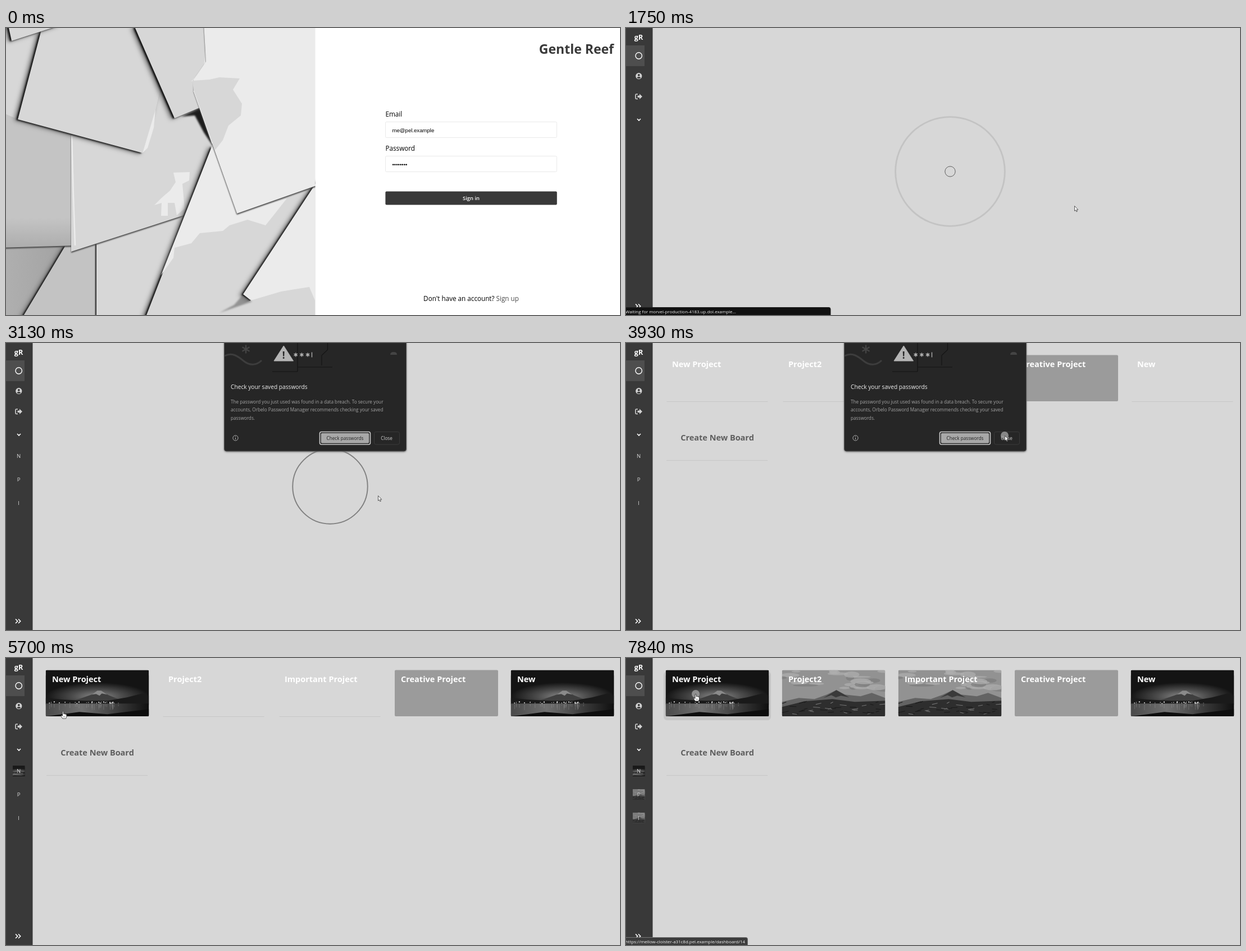
An HTML page for the animation above (7.99 s loop, 1093 by 512 pixels).

```html
<!DOCTYPE html>
<html lang="en">
<head>
<meta charset="utf-8">
<title>Board app demo</title>
<style>
html, body { margin: 0; width: 100%; height: 100%; overflow: hidden; background: #fff; }
svg { display: block; width: 100%; height: 100%; }
text { font-family: "Open Sans", "Noto Sans", sans-serif; white-space: pre; }
.b { font-weight: 700; }
.mid { text-anchor: middle; }
.lab { font-size: 11.7px; }
.ui { font-size: 8.2px; }
.arial { font-family: "Liberation Sans", Arial, sans-serif; font-size: 9.6px; }
.sheet { filter: drop-shadow(-3px 1px 1.5px #111) drop-shadow(-4px 1px 3.5px #777); }
.thin { filter: drop-shadow(-1.5px 1px 1px #1c1c1c); }
.under { filter: drop-shadow(0 2px 1px #444); }
.haze { filter: blur(1.5px); }
</style>
</head>
<body>
<svg id="stage" viewBox="0 0 1093 512" preserveAspectRatio="none"></svg>
<script>
const LOOP = 7990;
const stage = document.getElementById('stage');

let seed = 7;
const rnd = () => (seed = (seed * 16807) % 2147483647) / 2147483647;
const many = (n, f) => Array.from({ length: n }, (_, i) => f(i)).join('');
const rect = (x, y, w, h, fill, more = '') =>
  `<rect x="${x}" y="${y}" width="${w}" height="${h}" fill="${fill}" ${more}/>`;
const path = (d, fill, more = '') => `<path d="${d}" fill="${fill}" ${more}/>`;
const line = (d, color, w = 1, more = '') => path(d, 'none', `stroke="${color}" stroke-width="${w}" ${more}`);
const text = (x, y, s, fill, cls = '', size = '') =>
  `<text x="${x}" y="${y}" fill="${fill}" class="${cls}"${size && ` font-size="${size}"`}>${s}</text>`;
const group = (id, body, more = '') => `<g id="${id}" ${more}>${body}</g>`;

// Overlapping paper sheets, lowest first
const sheet = (d, fill, cls = 'sheet') => path(d + 'Z', fill, `class="${cls}"`);
const paper = `<g clip-path="url(#half)">
  ${rect(0, 0, 550, 512, '#d7d7d7')}
  ${sheet('M-9 388L110 386L31 520H-9', 'url(#shade)', 'thin')}
  ${sheet('M107 386L165 380V520H27', '#c3c3c3')}
  ${sheet('M161 384L330 326V520H161', '#d7d7d7', 'thin')}
  ${sheet('M-9 150L21 163L120 188L125 388L-9 392', 'url(#wall)', 'under')}
  ${sheet('M116 188L230 80L345 130L369 210L317 334L116 399', '#d7d7d7', 'under')}
  ${path('M298 258L327 257L326 272L314 278L318 322L304 334L300 312L288 312L288 335L276 335L277 312L264 316L277 303L292 290L302 275Z', '#ebebeb')}
  ${line('M117 192L120 300L123 388', '#ececec', 2.5)}
  ${sheet('M367 210L411 325L555 275V520H247', '#d7d7d7')}
  ${path('M367 210L411 331L500 304L478 332L462 352L430 342L398 352L386 362L345 366L330 384L300 392L298 410L276 441Z', '#ebebeb')}
  ${sheet('M556 270L422 475L436 486L480 520H560', '#ebebeb')}
  ${path('M360 512L436 486L490 470L540 462L550 486V512Z', '#d7d7d7')}
  ${path('M438 488L420 478L406 494L380 508Z', '#777', 'class="haze" opacity=".7"')}
  ${sheet('M62 7L21 163L243 223L266 148L275 109L240 -9H62', '#d7d7d7')}
  ${path('M266 146L243 223L252 214L263 178Z', '#ebebeb')}
  ${path('M345 142L369 212L352 186L336 156L312 158Z', '#1c1c1c', 'class="haze"')}
  ${sheet('M229 -2L300 161L345 142L420 -9', '#d7d7d7')}
  ${path('M366 0L356 30L352 70L330 95L380 92L420 0Z', '#ebebeb')}
  ${sheet('M334 112L411 331L556 280V-9H352L356 60L334 92', '#ebebeb', 'under')}
  ${path('M334 112L332 94L362 92L380 88L416 90L404 110L420 135L418 156L396 174L386 200L372 218Z', '#d7d7d7')}
  ${line('M334 112L367 206', '#f4f4f4')}${line('M367 208L411 331', '#999')}
  ${sheet('M3 -9L10 23L100 -6', '#d7d7d7')}
</g>`;

const field = y => rect(675.5, y, 305, 28, '#fff', 'rx="2" stroke="#e9e9e9"');
const mail = 'me@pel.example', dots = '••••••••';
const login = rect(0, 0, 1093, 512, '#fff') + paper +
  text(1082, 46, 'Gentle Reef', '#393939', 'b', 23).replace('<text', '<text text-anchor="end"') +
  text(675.5, 158, 'Email', '#000', 'lab') + field(167.5) +
  text(675.5, 219, 'Password', '#000', 'lab') + field(228.5) +
  group('autofill', text(687.5, 185.5, mail, '#000', 'arial') + text(687.5, 246.5, dots, '#000', 'arial')) +
  group('filled', text(687.5, 185.5, mail, '#000', 'lab') + text(687.5, 246.5, dots, '#000', 'lab')) +
  rect(675.4, 291.4, 305.4, 24.2, '#393939', 'rx="2" id="submit"') +
  text(828, 307, 'Sign in', '#fff', 'mid', 9.4).replace('<text', '<text font-weight="600"') +
  `<text x="828" y="487" class="lab mid">Don't have an account? <tspan fill="#4a4a4a">Sign up</tspan></text>`;

// Card pictures, 184 x 83
const lake = rect(0, 0, 184, 83, '#141414') +
  rect(0, 10, 184, 50, 'url(#glow)') +
  path('M34 60L62 51L82 44L92 37H99L112 45L134 54L156 60Z', '#3f3f3f') +
  path('M82 44L92 37H99L110 44L100 42L96 46L90 43Z', '#8a8a8a') +
  path('M0 50L30 53L70 55L110 55L145 49L172 42L184 46V62H0Z', '#1a1a1a') +
  rect(0, 60, 184, 23, 'url(#water)') +
  many(34, () => {
    const x = rnd() * 130, h = 2 + rnd() * 9;
    return `<circle cx="${x}" cy="${57 + rnd() * 3}" r="${.4 + rnd() * .8}" fill="#eee"/>` +
      rect(x - .4, 61, .9, h, '#bbb', 'opacity=".3"');
  }) + path('M0 83L60 75L110 79L184 70V83Z', '#0d0d0d');
const peaks = rect(0, 0, 184, 83, '#929292') +
  many(26, () => `<ellipse cx="${rnd() * 184}" cy="${rnd() * 34}" rx="${6 + rnd() * 17}" ry="${1.5 + rnd() * 4}" fill="${rnd() < .6 ? '#b0b0b0' : '#7c7c7c'}" opacity=".7"/>`) +
  path('M0 57L30 50L58 52L80 44L97 36L112 44L140 47L160 41L184 50V83H0Z', '#636363') +
  path('M74 50L97 36L120 49L105 46L96 49L88 45Z', '#3a3a3a') +
  path('M0 66L40 56L90 52L130 57L184 55V83H0Z', '#2e2e2e') +
  many(40, () => {
    const x = rnd() * 175, y = 57 + rnd() * 23;
    return line(`M${x} ${y}l${4 + rnd() * 9} ${rnd() * 5 - 3}`, rnd() < .5 ? '#747474' : '#1a1a1a', 1.1);
  });

const cardX = i => 70.5 + 207 * i;
const names = ['New Project', 'Project2', 'Important Project', 'Creative Project', 'New'];
const pic = (id, x, y, w, h) => `<use href="#${id}" x="${x}" y="${y}" width="${w}" height="${h}"/>`;
const rule = (x, y) => line(`M${x + 2} ${y}h180`, '#c6c6c6');
const card = (id, i) => pic(id, cardX(i), 21.5, 184, 82.5);
const boards = group('rulesA', rule(cardX(0), 104.5) + rule(cardX(4), 104.5)) +
  group('rulesB', rule(cardX(1), 104.5) + rule(cardX(2), 104.5)) + rule(70, 209.5) +
  rect(67, 24, 191, 87, '#c6c6c6', 'rx="6" id="shadow"') +
  group('lakes', card('lake', 0) + card('lake', 4)) +
  group('peaksCards', card('peaks', 1) + card('peaks', 2)) +
  rect(cardX(3) + .5, 21.5, 184, 82.5, '#9b9b9b', 'rx="2"') +
  names.map((s, i) => text(82 + 207 * i, 42.5, s, '#fff', 'b', 14.5)).join('') +
  text(162.5, 174, 'Create New Board', '#5e5e5e', 'b mid', 14.5);

const thumb = (id, y) => pic(id, 12, y, 21.5, 19);
const sidebar = rect(0, 0, 47.5, 512, '#393939') + rect(0, 31, 33, 37, '#4e4e4e') +
  text(22.5, 21, 'gR', '#fff', 'b mid', 12.6) +
  '<circle cx="22.7" cy="49.5" r="5.7" fill="none" stroke="#fff" stroke-width="1.4"/>' +
  '<circle cx="22.8" cy="85.7" r="5.6" fill="#d2d2d2"/><circle cx="22.8" cy="84" r="1.9" fill="#393939"/>' +
  path('M19.3 88.9Q20 87 22.8 87T26.3 88.9Q23 91.4 19.3 88.9Z', '#393939') +
  line('M21 118H18.5Q17 118 17 119.5V125Q17 126.5 18.5 126.5H21', '#d2d2d2', 1.6) +
  path('M20.5 120.6H24V117.6L29 122.3L24 127V124H20.5Z', '#d2d2d2') +
  line('M20 162L23 165L26 162', '#fff', 1.7) +
  line('M17 492.5L20.7 496.3L17 500M22 492.5L25.7 496.3L22 500', '#fff', 1.6) +
  group('thumbA', thumb('lake', 192), 'opacity=".85"') +
  group('thumbB', thumb('peaks', 234) + thumb('peaks', 275.5), 'opacity=".75"') +
  group('letters', ['N', 'P', 'I'].map((c, i) => text(22.7, 205.3 + 41.6 * i, c, '#d6d6d6', 'mid', 9.6)).join(''));

const star = (x, y, r, c, w) => line(many(3, i => {
  const a = Math.PI * (i / 3 + .5), dx = r * Math.cos(a), dy = r * Math.sin(a);
  return `M${x - dx} ${y - dy}L${x + dx} ${y + dy}`;
}), c, w);
const dialog = path('M388.5 -9H712.5V189Q712.5 193 708.5 193H392.5Q388.5 193 388.5 189Z', '#262626',
    'stroke="#555" style="filter:drop-shadow(0 1px 1.5px #777)"') +
  star(427, 11, 7.5, '#444', 2.4) +
  line('M389 23C402 16 412 23 423 32S446 40 455 31', '#3d3d3d', 3) +
  line('M474 51H519M519 43H581M519 0V51M572.5 0V12L562 22V40', '#151515', 1.2) +
  path('M494.3 5L477 32H511.5Z', '#b5b5b5', 'stroke="#b5b5b5" stroke-linejoin="round"') +
  text(494.3, 28, '!', '#262626', 'b mid', 17) +
  many(3, i => star(515.7 + 10.7 * i, 21, 3.6, '#b5b5b5', 1.5)) + line('M544.5 16.5V25.5', '#b5b5b5', 1.3) +
  path('M684 21Q684 16 690 16T696 21Z', '#444') +
  text(400, 82, 'Check your saved passwords', '#f0f0f0', '', 10.2) +
  ['The password you just used was found in a data breach. To secure your',
    'accounts, Orbelo Password Manager recommends checking your saved',
    'passwords.'].map((s, i) => text(400, 107.5 + 14.5 * i, s, '#a3a3a3', 'ui')).join('') +
  '<circle cx="408.5" cy="169.5" r="4.6" fill="none" stroke="#b5b5b5"/>' +
  line('M408.5 169V172M408.5 166.7V167.8', '#b5b5b5') +
  rect(558.5, 158.5, 90, 22.5, '#262626', 'rx="3" stroke="#ccc" stroke-width="1.6"') +
  rect(560.8, 160.8, 85.4, 18, '#a8a8a8', 'rx="2"') +
  text(603.5, 172.7, 'Check passwords', '#222', 'ui mid') +
  rect(655.5, 158.5, 45, 22.5, '#262626', 'rx="3" stroke="#3a3a3a"') +
  text(677.5, 172.7, 'Close', '#d0d0d0', 'ui mid');

const status = (id, w, fill, edge, s) => group(id,
  path(`M-2 498.5H${w - 3}Q${w} 498.5 ${w} 501.5V514H-2Z`, fill, `stroke="${edge}"`) +
  text(-1, 508.7, s, '#f2f2f2', '', 7.9));

stage.innerHTML = `<defs>
  <clipPath id="half"><path d="M0 0H550.5V512H0Z"/></clipPath>
  <clipPath id="round"><rect width="184" height="83" rx="3"/></clipPath>
  <linearGradient id="shade"><stop stop-color="#b0b0b0"/><stop offset="1" stop-color="#a2a2a2"/></linearGradient>
  <linearGradient id="wall" x2="0" y2="1"><stop stop-color="#c4c4c4"/><stop offset=".78" stop-color="#c4c4c4"/><stop offset="1" stop-color="#adadad"/></linearGradient>
  <linearGradient id="water"><stop stop-color="#4a4a4a"/><stop offset=".35" stop-color="#707070"/><stop offset="1" stop-color="#0f0f0f"/></linearGradient>
  <radialGradient id="glow" cy=".75"><stop stop-color="#8a8a8a"/><stop offset=".5" stop-color="#4a4a4a"/><stop offset="1" stop-color="#141414"/></radialGradient>
  <symbol id="lake" viewBox="0 0 184 83" preserveAspectRatio="xMidYMid slice"><g clip-path="url(#round)">${lake}</g></symbol>
  <symbol id="peaks" viewBox="0 0 184 83" preserveAspectRatio="xMidYMid slice"><g clip-path="url(#round)">${peaks}</g></symbol>
</defs>` +
  group('login', login) +
  group('app', rect(0, 0, 1093, 512, '#d7d7d7') + sidebar +
    group('loader', '<circle cx="577" cy="256"/>'.repeat(2), 'fill="none" stroke="#393939"') +
    group('boards', boards) + group('dialog', dialog) +
    status('waiting', 364, '#111', '#222', 'Waiting for morvel-production-4183.up.dol.example...') +
    status('link', 216.5, '#3c3c3c', '#777', 'https://mellow-cloister-a31c8d.pel.example/dashboard/14')) +
  '<circle id="click" r="7" fill="#a8a8a8" opacity=".75"/>' +
  group('arrow', path('M.5 .5V9.4L2.5 7.7L3.9 10.8L5.4 10.1L4 7.1H6.8Z', '#fff', 'stroke="#333" stroke-width=".8"')) +
  group('hand', path('M-1 .8Q0 -.4 1 .8V4.6Q2 3.9 2.9 4.9Q4 4.4 4.7 5.4Q6 5 6.4 6.4V9.5Q6 11.3 5.2 13H-.7Q-2.6 10.6-3.7 8.2Q-3.4 6.8-1 8.2Z', '#fff', 'stroke="#222" stroke-width=".8"') +
    line('M1.2 8.5V11M3.2 8.5V11', '#444', .6));

const el = {};
stage.querySelectorAll('[id]').forEach(n => el[n.id] = n);
const rings = [...el.loader.children];
const show = (id, on) => el[id].setAttribute('visibility', on ? 'inherit' : 'hidden');

const steps = [0, 510, 660, 790, 940, 1210, 1360, 1610, 1750, 1880, 2030, 2160, 2290, 2440, 2570, 2700,
  2850, 2980, 3130, 3260, 3390, 3520, 3650, 3780, 3930, 4060, 4190, 4340, 4750, 4880, 5010, 5280, 5410,
  5550, 5700, 5840, 5970, 6130, 6380, 7310, 7460, 7580, 7730, 7840];
const snap = t => steps.findLast(s => s <= t);

// Pointer path: time, x, y
const trail = [[510, 913, 428], [790, 820, 333], [940, 817, 311], [1360, 817, 311], [1610, 798, 317],
  [1750, 798, 317], [1880, 788, 313], [2290, 751, 302], [3130, 662, 272], [3650, 678, 182], [3780, 674, 165],
  [4340, 674, 165], [4750, 655, 162], [5010, 583, 183], [5280, 530, 187], [5410, 394, 150], [5550, 173, 114],
  [5700, 101.5, 95], [5840, 86, 66], [5970, 68, 37], [6130, 61, 17], [6380, 61, 17], [7310, 72, 35],
  [7460, 97, 50], [7580, 124, 64], [LOOP, 124, 64]];
function pointer(t) {
  const i = Math.max(1, trail.findIndex(k => k[0] >= t));
  const [a, x, y] = trail[i - 1], [b, u, v] = trail[i];
  const k = Math.max(0, (t - a) / (b - a));
  return [x + (u - x) * k, y + (v - y) * k];
}

function bezier(x1, y1, x2, y2) {
  const at = (p, q, u) => 3 * u * (1 - u) ** 2 * p + 3 * u * u * (1 - u) * q + u ** 3;
  return x => {
    let lo = 0, hi = 1;
    for (let i = 0; i < 24; i++) {
      const m = (lo + hi) / 2;
      if (at(x1, x2, m) < x) lo = m; else hi = m;
    }
    return at(y1, y2, lo);
  };
}
const grow = bezier(.165, .84, .44, 1), fade = bezier(.3, .61, .355, 1);

function draw(now) {
  const t = snap(now % LOOP);
  const within = (a, b) => t >= a && t < b;

  show('login', t < 1750);
  show('app', t >= 1750);
  show('autofill', t < 1210);
  show('filled', t >= 1210);
  el.submit.setAttribute('fill', within(940, 1610) ? '#505050' : '#393939');

  show('waiting', within(1750, 2160));
  show('letters', t >= 2570);
  show('loader', within(1750, 3520));
  rings.forEach((ring, i) => {
    const p = (.018 + (t - 1750) / 2000 + i / 2 + 1) % 1;
    const s = grow(p), o = 1 - fade(p);
    ring.setAttribute('r', 105.5 * s);
    ring.setAttribute('stroke-width', Math.max(.8, 3 * s));
    ring.setAttribute('opacity', o < .1 ? 0 : o);
  });

  show('dialog', within(2850, 4340));
  el.dialog.setAttribute('opacity', t === 2850 || t === 4190 ? .5 : 1);

  show('boards', t >= 3520);
  show('rulesA', t >= 3520 && t < 5700);
  show('rulesB', t >= 3520 && t < 5840);
  show('lakes', t >= 5700);
  show('thumbA', t >= 5700);
  show('peaksCards', t >= 5840);
  show('thumbB', t >= 5840);
  show('shadow', within(5840, 5970) || t >= 7460);
  el.shadow.setAttribute('opacity', t === 7460 || t === 5840 ? .6 : 1);
  show('link', t >= 7730);

  const hand = within(940, 1610) || within(5700, 5970) || t >= 7460;
  const [x, y] = pointer(t);
  show('arrow', t >= 510 && !hand);
  show('hand', hand);
  show('click', within(1210, 1360) || within(3930, 4060) || t >= 7840);
  ['arrow', 'hand', 'click'].forEach(id => el[id].setAttribute('transform', `translate(${x} ${y})`));
}

let start;
function tick(now) {
  start ??= now;
  draw(now - start);
  requestAnimationFrame(tick);
}
draw(0);
requestAnimationFrame(tick);
</script>
</body>
</html>
```
